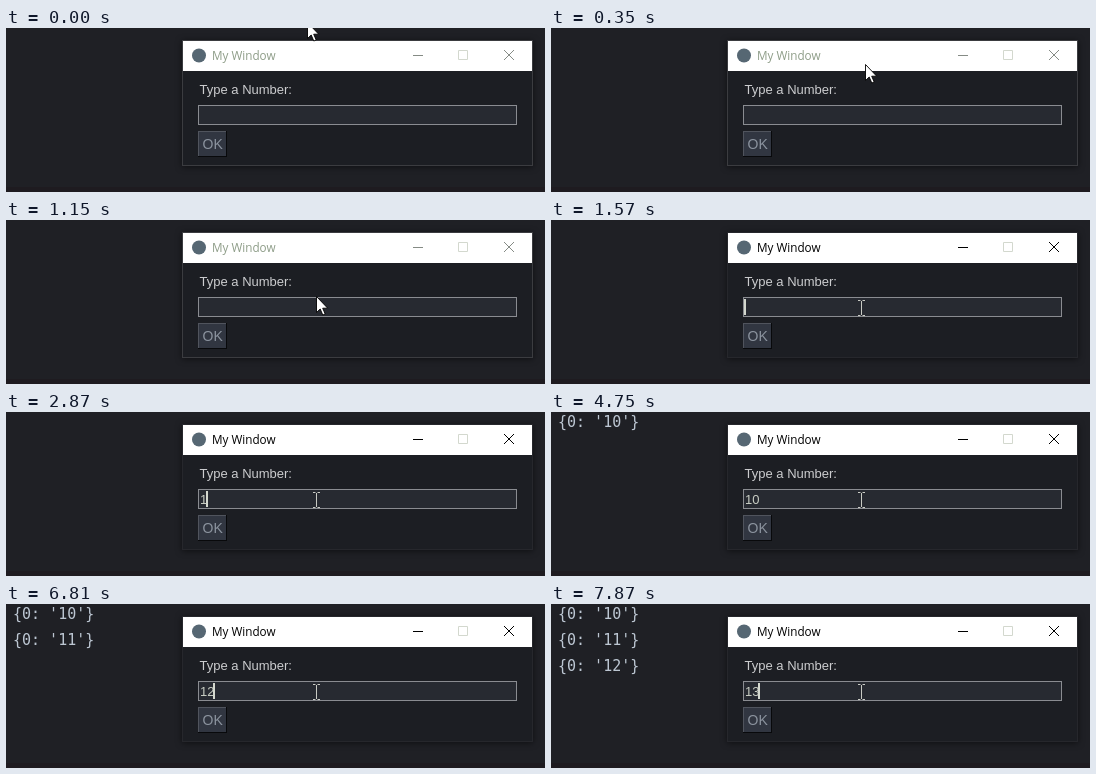
These frames come from a looping animation (539x164 px, 8000 ms). An HTML page:

```html
<!DOCTYPE html>
<html lang="en">
<head>
<meta charset="utf-8">
<title>My Window</title>
<style>
  html, body { margin: 0; width: 100%; height: 100%; overflow: hidden; background: #1f2025; }
  svg { display: block; width: 539px; height: 164px; }
  text { white-space: pre; }
  rect { shape-rendering: crispEdges; }
  .ui { font: 13px "Liberation Sans", Arial, sans-serif; }
  .console { font: 15px "DejaVu Sans Mono", monospace; fill: #bcc6d2; }
  .title { font: 11.7px "Open Sans", sans-serif; fill: #8e9d88; }
  .controls { fill: none; stroke: #858b85; }
  .frame { fill: #3b3c40; }
  .active .title { fill: #000; }
  .active .controls { stroke: #000; }
  .active .frame { fill: #26272c; }
  .shadow { filter: drop-shadow(0 1px 3px #0008); }
</style>
</head>
<body>
<svg viewBox="0 0 539 164">
  <rect width="539" height="164" fill="#1f2025"/>
  <rect y="159" width="539" height="5" fill="#1e1b20"/>
  <g class="console">
    <text x="7" y="15" data-at="3940">{0: '10'}</text>
    <text x="7" y="41" data-at="6060">{0: '11'}</text>
    <text x="7" y="67" data-at="7280">{0: '12'}</text>
  </g>
  <g id="win">
    <rect class="frame shadow" x="176" y="12" width="351" height="126"/>
    <rect x="177" y="43" width="349" height="94" fill="#1c1e23"/>
    <rect x="177" y="13" width="349" height="30" fill="#fff"/>
    <circle cx="193" cy="27.5" r="7" fill="#566773"/>
    <text class="title" x="206" y="32">My Window</text>
    <path class="controls" d="M407 27.5h10M498 22l10 10M508 22l-10 10"/>
    <path d="M452.5 22.5h9v9h-9z" fill="none" stroke="#d3d8ce"/>
    <text class="ui" x="193.5" y="66" fill="#cccdcf">Type a Number:</text>
    <rect x="192" y="77" width="319" height="20" fill="#8a8c91"/>
    <rect x="193" y="78" width="317" height="18" fill="#272a31"/>
    <text class="ui" id="entry" x="194" y="92" fill="#c8cdc3"></text>
    <rect id="caret" y="79" width="2" height="16" fill="#d4d8ce"/>
    <rect x="192" y="103" width="29" height="26" fill="#08090b"/>
    <rect x="192" y="103" width="28" height="25" fill="#50545d"/>
    <rect x="193" y="104" width="27" height="24" fill="#313641"/>
    <text class="ui" x="196.5" y="121" style="font-size:14px" fill="#8c949f">OK</text>
  </g>
  <path id="arrow" d="M.5 .5v16l3.7-3.5 2.6 6 2.4-1-2.5-5.8h5z" fill="#fff" stroke="#000" stroke-width=".9"/>
  <path id="beam" d="M-3-7.5h2.5M1.500-7.5h2.500M-3 7.500h2.500M1.500 7.500h2.500M.5-7v14" fill="none" stroke="#c9cbc4"/>
</svg>
<script>
const LOOP = 8000;
const $ = id => document.getElementById(id);
const lines = [...document.querySelectorAll('[data-at]')];

const mousePath = [
  [0, 301, -6], [20, 301, -6], [350, 314, 36], [820, 314, 68],
  [990, 314, 68], [1150, 310, 76], [1290, 310, 88]
];
const typed = [
  [0, ''], [2870, '1'], [3170, '10'], [5410, '1'], [5590, '11'],
  [6620, '1'], [6780, '12'], [7660, '1'], [7870, '13']
];
// The caret flips between hidden and shown at each of these times.
const blinks = [1550, 2150, 2440, 3010, 3300, 3880, 4170, 4750, 5060, 5640, 5930, 6510, 6810, 7390, 7690];

function mouseAt(t) {
  const i = mousePath.findIndex(p => p[0] > t);
  if (i < 0) return mousePath.at(-1).slice(1);
  const [t0, x0, y0] = mousePath[i - 1], [t1, x1, y1] = mousePath[i];
  const k = (t - t0) / (t1 - t0);
  return [Math.round(x0 + (x1 - x0) * k), Math.round(y0 + (y1 - y0) * k)];
}

function show(el, on) {
  el.setAttribute('visibility', on ? 'visible' : 'hidden');
}

function draw(now) {
  const t = now % LOOP;
  const [x, y] = mouseAt(t);
  const overEntry = y > 76;
  for (const id of ['arrow', 'beam']) {
    $(id).setAttribute('transform', `translate(${x} ${y})`);
    show($(id), (id === 'beam') === overEntry);
  }

  const value = typed.findLast(([at]) => at <= t)[1];
  $('entry').textContent = value;
  $('caret').setAttribute('x', 193 + 7 * value.length);
  show($('caret'), blinks.filter(at => at <= t).length % 2);

  $('win').classList.toggle('active', t >= 1470);
  for (const line of lines) show(line, t >= +line.dataset.at);
  requestAnimationFrame(draw);
}
draw(performance.now());
</script>
</body>
</html>
```
